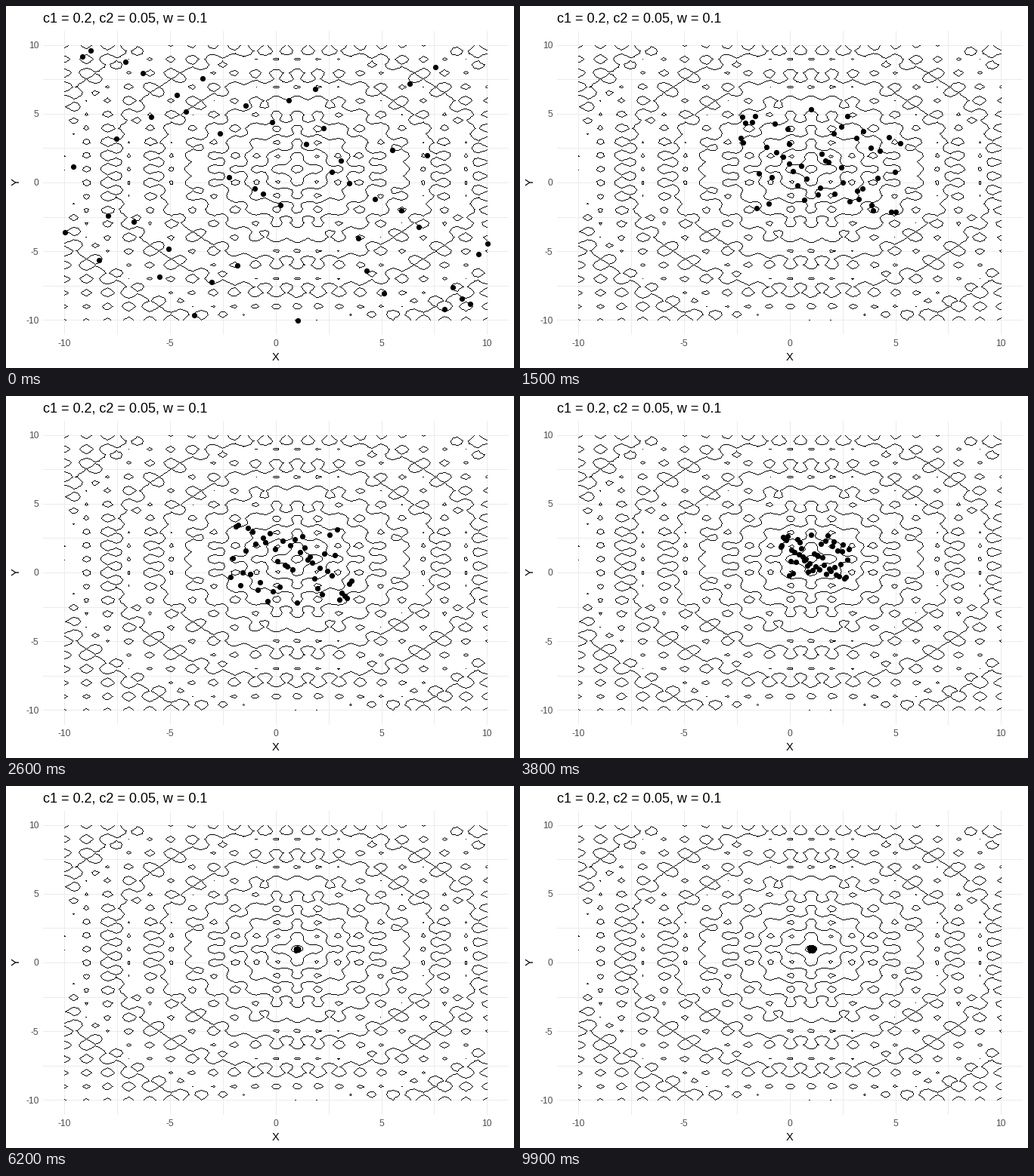
These frames come from a looping animation (672 px wide and 480 px high, 10 s). A matplotlib script:

```python
import numpy as np
import matplotlib.pyplot as plt
from matplotlib.animation import FuncAnimation

W, H, DPI = 672, 480, 96
PX = 72 / DPI
CENTRE = np.array([356.8, 234.0])
UNIT = np.array([27.945, -18.25])
LIMIT = 11
COUNT = 50
GRID_GREY, LABEL_GREY = 0xEB, "#4D4D4D"

plt.rcParams["font.family"] = "Liberation Sans"


def to_px(points):
    return CENTRE + np.asarray(points) * UNIT


def ackley(x, y):
    dist = np.sqrt(0.5 * ((x - 1) ** 2 + (y - 1) ** 2))
    waves = 0.5 * (np.cos(2 * np.pi * x) + np.cos(2 * np.pi * y))
    return 20 - 20 * np.exp(-0.2 * dist) + np.e - np.exp(waves)


# Swarm: a damped swing of the start layout around the best point
rng = np.random.default_rng(4)
start = np.column_stack([np.linspace(-10, 10, COUNT),
                         rng.permutation(np.linspace(-10, 9.6, COUNT))])
drift = rng.uniform(-0.7, 0.7, (COUNT, 2))
DECAY = 0.048
SWING_STEPS = [0, 7.2, 12, 26, 38, 62, 100]
HALF_TURNS = [0, 0.5, 1, 2, 3, 5.5, 9]
FOUND_FROM, FOUND_TO = 11, 15


def swarm(step):
    size = np.exp(-DECAY * step)
    angle = np.pi * np.interp(step, SWING_STEPS, HALF_TURNS)
    u = np.clip((step - FOUND_FROM) / (FOUND_TO - FOUND_FROM), 0, 1)
    best = u * u * (3 - 2 * u)
    return (best + size * np.cos(angle) * (start - best)
            + size * np.sin(angle) * drift)


# Background: hard-edged lines one pixel wide
canvas = np.full((H, W), 255, dtype=np.uint8)


def draw_line(a, b, shade):
    steps = int(np.abs(b - a).max())
    t = np.linspace(0, 1, steps + 1)[:, None]
    x, y = np.rint(a + (b - a) * t).astype(int).T
    canvas[y, x] = shade


for v in np.arange(-10, 10.1, 2.5):
    for ends in ([(v, -LIMIT), (v, LIMIT)], [(-LIMIT, v), (LIMIT, v)]):
        draw_line(*np.rint(to_px(ends)), GRID_GREY)

fig = plt.figure(figsize=(W / DPI, H / DPI), dpi=DPI, facecolor="white")
ax = fig.add_axes([0, 0, 1, 1])

axis = np.linspace(-10, 10, 100)
gx, gy = np.meshgrid(axis, axis)
rings = ax.contour(gx, gy, ackley(gx, gy), levels=np.arange(0, 23, 2))
for level in rings.allsegs:
    for path in level:
        corners = np.rint(to_px(path))
        for a, b in zip(corners[:-1], corners[1:]):
            draw_line(a, b, 0)
rings.remove()

fig.figimage(canvas, cmap="gray", vmin=0, vmax=255, zorder=-1)
ax.set_xlim(0, W)
ax.set_ylim(H, 0)
ax.axis("off")


def label(x, y, text, size, color="black", **kw):
    ax.text(x, y, text, fontsize=size * PX, color=color, **kw)


for v in range(-10, 11, 5):
    x, y = to_px((v, v))
    label(x, 451, str(v), 12, LABEL_GREY, ha="center")
    label(43.5, y + 4.5, str(v), 12, LABEL_GREY, ha="right")
label(49, 22, "c1 = 0.2, c2 = 0.05, w = 0.1", 18)
label(CENTRE[0], 470, "X", 14.67, ha="center")
label(21, CENTRE[1] - 1, "Y", 14.67, ha="right", va="center", rotation=90)

dots, = ax.plot([], [], "o", color="black", ms=7.2 * PX, mew=0)


def update(step):
    dots.set_data(*(to_px(swarm(step)) + 0.5).T)
    return dots,


anim = FuncAnimation(fig, update, frames=100, interval=100, repeat=True,
                     repeat_delay=0, blit=True)
plt.show()
```
